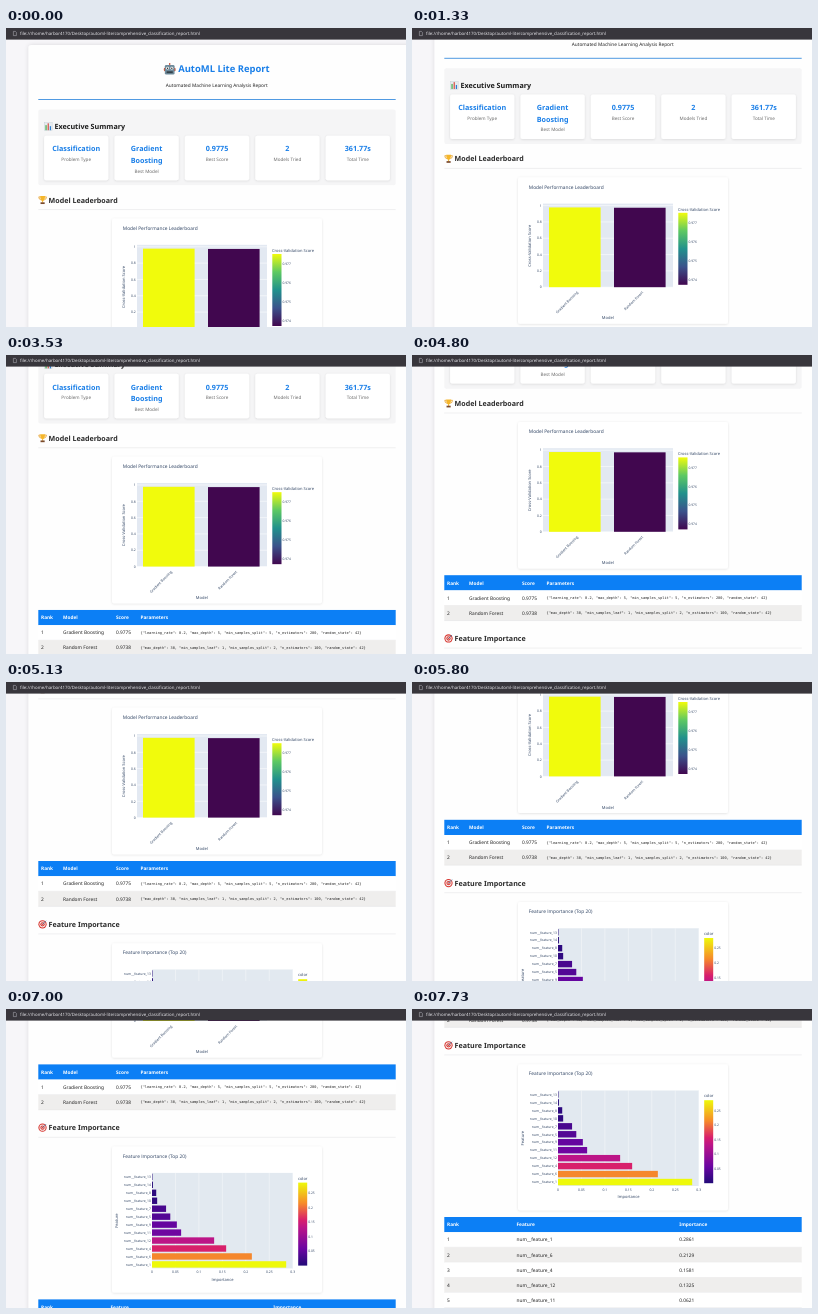
Animation of 400 by 299 pixels, one loop 8 s. Source, as an HTML page:

```html
<!DOCTYPE html>
<html lang="en">
<head>
<meta charset="utf-8">
<title>AutoML Lite Report</title>
<style>
  html, body { margin: 0; width: 100%; height: 100%; overflow: hidden; background: #f7f6f9; }
  svg { display: block; width: 100%; height: 100%; text-rendering: geometricPrecision; }
  text { font-family: "Noto Sans", sans-serif; white-space: pre; }
  .plot { font-family: "Open Sans", sans-serif; fill: #2a3f5f; }
  .code { font-family: "DejaVu Sans Mono", monospace; }
  .b { font-weight: 700; }
</style>
</head>
<body>
<svg id="stage" viewBox="0 0 400 299" xmlns="http://www.w3.org/2000/svg"></svg>
<script>
const VIRIDIS = [[0, '#41074f'], [.25, '#3b528b'], [.5, '#21918c'], [.75, '#5ec962'], [1, '#f1fb0c']];
const PLASMA = [[0, '#220a78'], [.2, '#6a05a2'], [.46, '#bb1588'], [.55, '#d81f6c'], [.75, '#f68a2a'], [1, '#eef90a']];
const BLUE = '#1a7fe8';
const LEFT = 32.3, WIDTH = 357.4, RIGHT = LEFT + WIDTH;

const rect = (x, y, w, h, fill, extra = '') =>
  `<rect x="${x}" y="${y}" width="${w}" height="${h}" fill="${fill}" ${extra}/>`;
const line = (x1, y1, x2, y2, color, w) =>
  `<path d="M${x1} ${y1}L${x2} ${y2}" stroke="${color}" stroke-width="${w}"/>`;
const rule = (y, color, w) => line(LEFT, y, RIGHT, y, color, w);

// y is the visual middle of the line of text
function text(x, y, str, size, { cls = '', fill, anchor = 'start', turn = 0 } = {}) {
  const paint = fill ? `fill="${fill}"` : '';
  return `<text class="${cls}" ${paint} font-size="${size}" text-anchor="${anchor}"
    transform="translate(${x} ${y}) rotate(${turn})" y="${size * .36}">${str}</text>`;
}
const plot = (x, y, str, size, anchor, turn) => text(x, y, str, size, { cls: 'plot', anchor, turn });

const gradient = (id, stops) => `<linearGradient id="${id}" x1="0" y1="1" x2="0" y2="0">${
  stops.map(([o, c]) => `<stop offset="${o}" stop-color="${c}"/>`).join('')}</linearGradient>`;

function sample(stops, v) {
  const i = Math.max(1, stops.findIndex(s => s[0] >= v));
  const [a, ca] = stops[i - 1], [b, cb] = stops[i], f = (v - a) / (b - a);
  const channel = (c, k) => parseInt(c.substr(1 + 2 * k, 2), 16);
  return `rgb(${[0, 1, 2].map(k => Math.round(channel(ca, k) * (1 - f) + channel(cb, k) * f))})`;
}

// Icons are drawn in a 10 x 10 box
const icon = (x, y, size, body) => `<g transform="translate(${x} ${y}) scale(${size / 10})">${body}</g>`;
const ICONS = {
  robot: '<path d="M5 0V2" stroke="#c8553f" stroke-width="1"/>' +
    rect(0, 4, 10, 3, '#c8553f', 'rx="1"') + rect(.9, 1.6, 8.2, 8.2, '#6f8b9b', 'rx="1.2"') +
    '<circle cx="3.2" cy="4.4" r="1.2" fill="#fff"/><circle cx="6.8" cy="4.4" r="1.2" fill="#fff"/>' +
    '<circle cx="3.2" cy="4.4" r=".6" fill="#222"/><circle cx="6.8" cy="4.4" r=".6" fill="#222"/>' +
    rect(2.4, 7, 5.2, 1.6, '#34424b'),
  chart: rect(.3, .3, 9.4, 9.4, '#e6ebef', 'stroke="#b9c6cf" stroke-width=".4"') +
    rect(1.7, 3.4, 1.5, 6, '#4caf50') + rect(4.3, 1.2, 1.5, 8.2, '#d8564c') + rect(6.9, 4.6, 1.5, 4.8, '#2f7ed0'),
  trophy: '<path d="M2.5 1.5H.6Q.6 4.6 3 5M7.5 1.5H9.4Q9.4 4.6 7 5" fill="none" stroke="#e59a1c" stroke-width=".9"/>' +
    '<path d="M2.2.5H7.8Q7.8 5.6 5.6 6.2V8H4.4V6.2Q2.2 5.6 2.2.5Z" fill="#f5b62b"/>' + rect(2.6, 7.8, 4.8, 2, '#7a4a2c'),
  target: [[4.8, '#d8352f'], [3.6, '#f6f2f0'], [2.5, '#d8352f'], [1.3, '#f6f2f0'], [.7, '#d8352f']]
    .map(([r, c]) => `<circle cx="4.9" cy="5.1" r="${r}" fill="${c}"/>`).join('') +
    '<path d="M5 5L9 1" stroke="#3d6f9c" stroke-width=".9"/>'
};

const card = (x, y, w, h) => rect(x, y, w, h, '#fff', 'rx="2" filter="url(#shade)"');

const heading = (y, name, str) => icon(LEFT, y - 4.4, 8.6, ICONS[name]) +
  text(42.6, y, str, 7.12, { cls: 'b', fill: '#2b2b2b' }) + rule(y + 9.6, '#e4e4e6', .6);

function table(mid, xs, head, rows) {
  let out = rect(LEFT, mid - 7.6, WIDTH, 15.2, '#0c7ff5');
  head.forEach((h, i) => out += text(xs[i], mid, h, 4.75, { cls: 'b', fill: '#fff' }));
  rows.forEach((row, r) => {
    const y = mid + 15.1 * (r + 1);
    out += rect(LEFT, y - 7.5, WIDTH, 15.1, r % 2 ? '#efeeed' : '#fff') + rule(y + 7.6, '#dcdcde', .4);
    row.forEach((c, i) => {
      const code = c[0] === '{';
      out += text(xs[i], y, c, code ? 3.57 : 4.8, { cls: code ? 'code' : '', fill: '#222' });
    });
  });
  return out;
}

function summary() {
  const items = [
    ['Classification', 'Problem Type'], ['Gradient Boosting', 'Best Model'], ['0.9775', 'Best Score'],
    ['2', 'Models Tried'], ['361.77s', 'Total Time']
  ];
  let out = rect(LEFT, 81.5, WIDTH, 75.8, '#f5f5f6', 'rx="2"') + icon(38, 94.3, 8.4, ICONS.chart) +
    text(48.4, 98.6, 'Executive Summary', 7.2, { cls: 'b', fill: '#1c1c1c' });
  items.forEach(([value, label], i) => {
    const x = 38.1 + 70.4 * i, mid = x + 32.1;
    const lines = value.split(' ');
    out += card(x, 107.7, 64.2, 44.5);
    lines.forEach((s, k) => out += text(mid, 120.8 + 11.4 * k, s, 7.2, { cls: 'b', fill: BLUE, anchor: 'middle' }));
    out += text(mid, 120.3 + 11.3 * lines.length, label, 4.6, { fill: '#6c6c6c', anchor: 'middle' });
  });
  return out;
}

function scoreChart() {
  const top = 216.8, base = 300.4, unit = 81.6;
  let out = card(106, 190.5, 210, 146.5) + plot(116.8, 200, 'Model Performance Leaderboard', 4.84) +
    rect(131, top, 130, base - top, '#e3e9f2');
  for (let i = 0; i <= 5; i++) {
    const y = base - unit * i / 5;
    out += line(131, y, 261, y, '#fff', .5) + plot(129.8, y, String(i / 5), 3.4, 'end');
  }
  [['Gradient Boosting', .9775, 1, 137], ['Random Forest', .9738, 0, 202]].forEach(([name, v, c, x]) => {
    out += rect(x, base - v * unit, 51.6, v * unit, VIRIDIS[c * 4][1]) +
      plot(x + 28.5, 305, name, 3.55, 'end', -45);
  });
  out += plot(195.8, 331.2, 'Model', 4.05, 'middle') +
    plot(117.8, 259, 'Cross-Validation Score', 4.05, 'middle', -90) +
    plot(266, 222.4, 'Cross-Validation Score', 4.05) + rect(266.3, 226, 9.2, 72, 'url(#viridis)');
  for (let i = 0; i < 4; i++) out += plot(276.4, 236 + 18.9 * i, (.977 - i / 1000).toFixed(3), 3.3);
  return out;
}

function featureChart() {
  const ids = [13, 14, 8, 10, 7, 5, 9, 11, 12, 4, 6, 1];
  const vals = [.001, .002, .009, .011, .03, .039, .053, .0621, .1325, .1581, .2129, .2861];
  const x0 = 146, top = 452.3, h = 95.5, step = h / 12, unit = 469;
  let out = card(106, 426, 210, 146) + plot(116.8, 435.4, 'Feature Importance (Top 20)', 4.84) +
    rect(x0, top, 141, h, '#e2e9f0');
  for (let i = 0; i <= 6; i++) {
    const x = x0 + unit * i / 20;
    out += line(x, top, x, top + h, '#fff', .4) + plot(x, 551.2, String(i / 20), 3.4, 'middle');
  }
  vals.forEach((v, i) => {
    const y = top + step * (i + .5);
    out += rect(x0, y - 3.2, v * unit, 6.4, sample(PLASMA, v / .2861)) +
      plot(145, y, 'num__feature_' + ids[i], 3.4, 'end');
  });
  out += plot(216.5, 558.6, 'Importance', 4.05, 'middle') + plot(110.6, 500, 'Feature', 4.05, 'middle', -90) +
    plot(292, 457.6, 'color', 4.05) + rect(292.2, 462, 9, 83, 'url(#plasma)');
  for (let i = 1; i <= 5; i++) out += plot(302.2, 545 - 14.55 * i, String(i / 20), 3.3);
  return out;
}

const page = rect(22.5, 17, 400, 700, '#fefefe', 'rx="3" filter="url(#soft)"') +
  icon(157.8, 35, 11.8, ICONS.robot) +
  text(172.2, 40.9, 'AutoML Lite Report', 9.42, { cls: 'b', fill: BLUE }) +
  text(210.7, 57.1, 'Automated Machine Learning Analysis Report', 4.76, { fill: '#222', anchor: 'middle' }) +
  rule(71.5, '#3d8fdf', .9) +
  summary() +
  heading(172, 'trophy', 'Model Leaderboard') + scoreChart() +
  table(351.4, [35, 57, 110, 134.5], ['Rank', 'Model', 'Score', 'Parameters'], [
    ['1', 'Gradient Boosting', '0.9775', '{"learning_rate": 0.2, "max_depth": 5, "min_samples_split": 5, "n_estimators": 200, "random_state": 42}'],
    ['2', 'Random Forest', '0.9738', '{"max_depth": 30, "min_samples_leaf": 1, "min_samples_split": 2, "n_estimators": 100, "random_state": 42}']
  ]) +
  heading(407.1, 'target', 'Feature Importance') + featureChart() +
  table(586.4, [35, 104.5, 267.3], ['Rank', 'Feature', 'Importance'],
    [[1, .2861], [6, .2129], [4, .1581], [12, .1325], [11, .0621]]
      .map(([id, v], i) => [String(i + 1), 'num__feature_' + id, v.toFixed(4)]));

const bar = rect(0, 0, 400, 11.6, '#38363c') +
  '<path d="M7.4 3.4h2l1 1v3.2h-3z" fill="none" stroke="#b9b9c0" stroke-width=".5"/>' +
  text(14, 5.5, 'file:///home/harbor4170/Desktop/automl-lite/comprehensive_classification_report.html', 4.4, { fill: '#e4e4e8' });

document.getElementById('stage').innerHTML = `<defs>${gradient('viridis', VIRIDIS)}${gradient('plasma', PLASMA)}
  <filter id="shade" x="-10%" y="-10%" width="120%" height="125%">
    <feDropShadow dx="0" dy=".6" stdDeviation="1" flood-opacity=".12"/></filter>
  <filter id="soft" x="-3%" y="-3%" width="106%" height="106%">
    <feDropShadow dx="0" dy="0" stdDeviation="2" flood-opacity=".12"/></filter></defs>
  ${rect(0, 0, 400, 299, '#f7f6f9')}<g id="page">${page}</g>${bar}`;

// Wheel turns: start time in ms, number of notches
const LOOP = 8000, NOTCH = 41.2;
const TURNS = [[1130, 1], [1670, 1], [3530, 1], [4930, 1], [5600, 1], [6200, 1], [6800, 1], [7530, 2]];

function scrollAt(t) {
  return TURNS.reduce((sum, [start, n]) => {
    const p = t < start ? 0 : Math.min(4, Math.floor((t - start) / 66) + 1) / 4;
    return sum + n * NOTCH * p * p * (3 - 2 * p);
  }, 0);
}

const pageNode = document.getElementById('page');
const begin = performance.now();
function draw(now) {
  const t = Math.max(0, now - begin) % LOOP;
  pageNode.setAttribute('transform', `translate(0 ${-scrollAt(t)})`);
  requestAnimationFrame(draw);
}
draw(begin);
</script>
</body>
</html>
```
